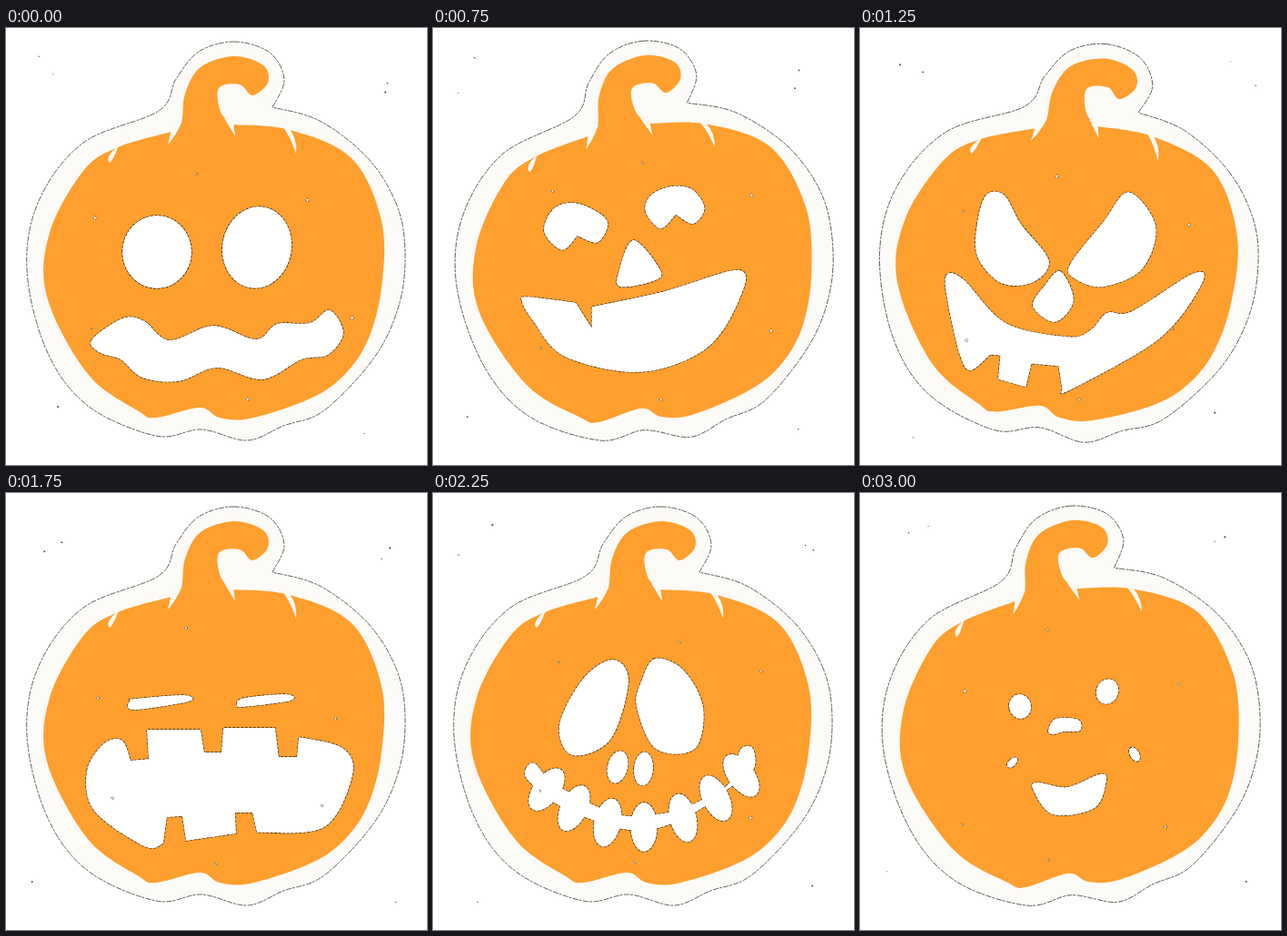
Write an HTML page that moves like this. It is 463 px wide and 480 px high and loops after 3.25 s.

```html
<!DOCTYPE html>
<html lang="en">
<head>
<meta charset="utf-8">
<title>Jack-o'-lantern faces</title>
<style>
  html, body { margin: 0; width: 100%; height: 100%; overflow: hidden; background: #fff; }
  svg { display: block; width: 463px; height: 480px; }
  .rim { fill: #fcfbf7; stroke: #222; stroke-width: .7; stroke-dasharray: 6 1.5 3 1; }
  .skin { fill: #ff9f2e; }
  .crease { fill: #fcfbf7; }
  .cut { fill: #fff; stroke: #222; stroke-width: 1.3; stroke-dasharray: 3 1.5; paint-order: stroke; }
  .spark { fill: #fff; stroke: #333; stroke-width: .7; stroke-dasharray: 2 1; }
  .dust { fill: #555; }
</style>
</head>
<body>
<svg viewBox="0 0 463 480">
  <g id="pumpkin">
    <path class="rim" id="rim"/>
    <path class="skin" id="skin"/>
    <path class="crease" d="M124 129Q108 142 114 148Q118 145 124 129Z
      M182 111L178 128Q187 118 194 102Z
      M240 99L252 119L250 104Z
      M305 109Q314 122 319 138Q321 124 312 111Z"/>
  </g>
  <path class="cut" id="face"/>
  <g id="specks"></g>
</svg>
<script>
const STEP = 250;
const CENTER = { x: 231.5, y: 240 };
const TILTS = [0, 0, 0, -5, 0, 5, 0, 0, -5, 0, 5, 0, -5];

const byId = id => document.getElementById(id);
const turn = angle => `rotate(${angle} ${CENTER.x} ${CENTER.y})`;

// Closed Catmull-Rom curve; "!" marks a sharp corner.
function blob(text) {
  const pts = text.trim().split(/\s+/).map(item => {
    const [x, y] = item.replace('!', '').split(',').map(Number);
    return { x, y, sharp: item.endsWith('!') };
  });
  const at = i => pts[(i + pts.length) % pts.length];
  const handle = (p, from, to, sign) =>
    `${(p.x + sign * (to.x - from.x) / 6).toFixed(2)} ${(p.y + sign * (to.y - from.y) / 6).toFixed(2)}`;
  let d = `M${pts[0].x} ${pts[0].y}`;
  pts.forEach((a, i) => {
    const b = at(i + 1);
    d += `C${handle(a, a.sharp ? a : at(i - 1), b, 1)} ` +
         `${handle(b, a, b.sharp ? b : at(i + 2), -1)} ${b.x} ${b.y}`;
  });
  return d + 'Z';
}

function egg(cx, cy, rx, ry, tilt = 0) {
  const angle = tilt * Math.PI / 180;
  const dx = rx * Math.cos(angle), dy = rx * Math.sin(angle);
  const arc = `A${rx} ${ry} ${tilt} 0 1 `;
  return `M${cx - dx} ${cy - dy}${arc}${cx + dx} ${cy + dy}${arc}${cx - dx} ${cy - dy}Z`;
}

function queasy() {
  const mouth = blob(`94,343 128,319 152,322 180,343 228,327 275,342 298,325 334,324 356,310
    371,335 354,359 325,364 282,386 232,373 190,388 150,384 126,364 104,357`);
  return egg(166, 246, 38, 40) + egg(276, 241, 38, 45, 10) + mouth;
}

function fang() {
  const left = blob('124,214 138,189 165,187 194,208 182,231 160,222! 142,236');
  const right = blob('237,202 244,185 266,177 290,182 302,204 288,220 270,208! 252,222');
  const nose = blob('221,232 248,268 238,279 203,282 201,268');
  const mouth = blob(`93,288 100,284 152,295! 167,324! 169,301! 250,291 334,275 331,308
    290,358 216,377 135,353 103,310`);
  return left + right + nose + mouth;
}

function wicked() {
  const left = blob('127,225 134,192 154,190 175,220 209,257 195,282 160,287 131,261');
  const right = blob('233,259 265,210 290,175 323,210 312,258 270,281 238,274');
  const nose = blob('223,268 240,299 222,324 196,309 207,285');
  const mouth = blob(`98,284 117,286 168,330 238,339 262,329 278,309 305,305 368,258 379,268
    338,332 245,397 236,397! 230,372! 200,372! 196,398! 165,392! 165,366! 154,366! 134,385
    121,370 103,315`);
  return left + right + nose + mouth;
}

function howling() {
  const left = blob('136,228 142,226 195,222 201,229 140,238');
  const right = blob('254,232 262,225 308,221 313,228 261,235');
  const mouth = blob(`89,305 108,275 128,272 137,294! 157,292! 155,260! 214,260! 218,285!
    237,285! 239,258! 296,258! 300,290! 320,290! 322,268! 370,280 381,310 350,367 276,373!
    271,351! 252,351! 253,374! 198,382! 194,355! 177,356! 173,385! 152,388 97,349`);
  return left + right + mouth;
}

function stitched() {
  const left = blob('198,183 215,207 195,271 153,288 139,255 165,204');
  const right = blob('244,182 229,207 224,235 245,281 288,281 297,235 275,194');
  const smile = blob(`102,303 112,297 132,318 184,346 218,355 262,350 298,336 327,317 338,282
    352,281 352,305 323,326 288,351 247,368 207,369 167,356 133,340 104,315`);
  const stitches = [125, 155, 192, 232, 275, 311, 339].map(x => {
    const bend = x < 228 ? .0039 : .0046;
    return egg(x, 367 - bend * (x - 228) ** 2, 14.5, 27, (232 - x) * .34);
  });
  return left + right + egg(203, 301, 11, 18, 14) + egg(231.5, 303, 10.5, 18.5, 5) +
    smile + stitches.join('');
}

function angry() {
  const left = blob('120,215 130,190 145,195 196,233 182,259 150,264 126,245');
  const right = blob('237,229 275,200 298,189 309,215 290,260 250,257');
  const mouth = blob(`97,320 112,291 140,290! 141,313! 153,313! 152,290! 190,291 250,317 318,300
    336,290 346,298 333,342 290,379 257,379 253,367! 244,368! 244,385! 209,385! 207,365! 198,367!
    196,386! 150,385 101,345`);
  return left + right + mouth;
}

function cute() {
  const nose = blob('207,261 215,248 240,249 242,261 225,262 212,265');
  const mouth = blob('190,325 196,318 228,323 263,309 271,315 258,346 212,353');
  return egg(176, 234.5, 12, 13.5, -15) + egg(272, 218, 12, 14, 20) + nose +
    egg(167.5, 296, 4, 7, 45) + egg(302, 287, 5, 8.5, -30) + mouth;
}

function randomFrom(seed) {
  return () => {
    seed = (seed * 16807) % 2147483647;
    return seed / 2147483647;
  };
}

// Sparks ring the face, dust gathers in the four corners.
function specksFor(step) {
  const rand = randomFrom(7919 * (step + 3));
  const dot = (kind, x, y, r) =>
    `<circle class="${kind}" cx="${x.toFixed(1)}" cy="${y.toFixed(1)}" r="${r.toFixed(1)}"/>`;
  let out = '';
  for (let i = 0; i < 6; i++) {
    const angle = (i + .2 + rand() * .6) * Math.PI / 3;
    const reach = .85 + rand() * .25;
    out += dot('spark', CENTER.x + 145 * reach * Math.cos(angle),
      275 + 125 * reach * Math.sin(angle), .8 + rand());
  }
  for (let i = 0; i < 6; i++) {
    const sx = i % 2 ? 1 : -1;
    const sy = i % 4 < 2 ? -1 : 1;
    out += dot('dust', CENTER.x + sx * (155 + rand() * 50),
      CENTER.y + sy * (165 + rand() * 45), .5 + rand() * .7);
  }
  return out;
}

byId('rim').setAttribute('d', blob(`251,15 290,27 306,57 293,87! 345,102 398,143 430,195 439,248
  432,305 405,362 350,420 305,437 265,453 215,441 165,448 90,415 45,355 23,266 36,190 85,126
  168,91 187,56 212,26`));
byId('skin').setAttribute('d', blob(`193,103 197,72 214,43 251,31 283,41 288,60 271,74 257,62
  234,66 236,92 249,106! 312,112 380,143 413,212 413,285 397,345 368,385 330,409 268,429 235,428
  213,417 165,428 146,421 90,380 45,295 48,225 85,157 123,131 182,114!`));

const faces = [queasy, fang, wicked, howling, stitched, angry, cute];
const cuts = faces.map(face => face());

let shown = -1;
function draw(time) {
  const step = Math.floor(time / STEP) % TILTS.length;
  if (step === shown) return;
  shown = step;
  const look = step >> 1;
  const lean = faces[look] === cute ? 5 : 0; // its outline already includes the tilt
  byId('pumpkin').setAttribute('transform', turn(TILTS[step]));
  byId('face').setAttribute('transform', turn(TILTS[step] + lean));
  byId('face').setAttribute('d', cuts[look]);
  byId('specks').innerHTML = specksFor(step);
}

const start = performance.now();
function tick() {
  draw(performance.now() - start);
  requestAnimationFrame(tick);
}
tick();
</script>
</body>
</html>
```
